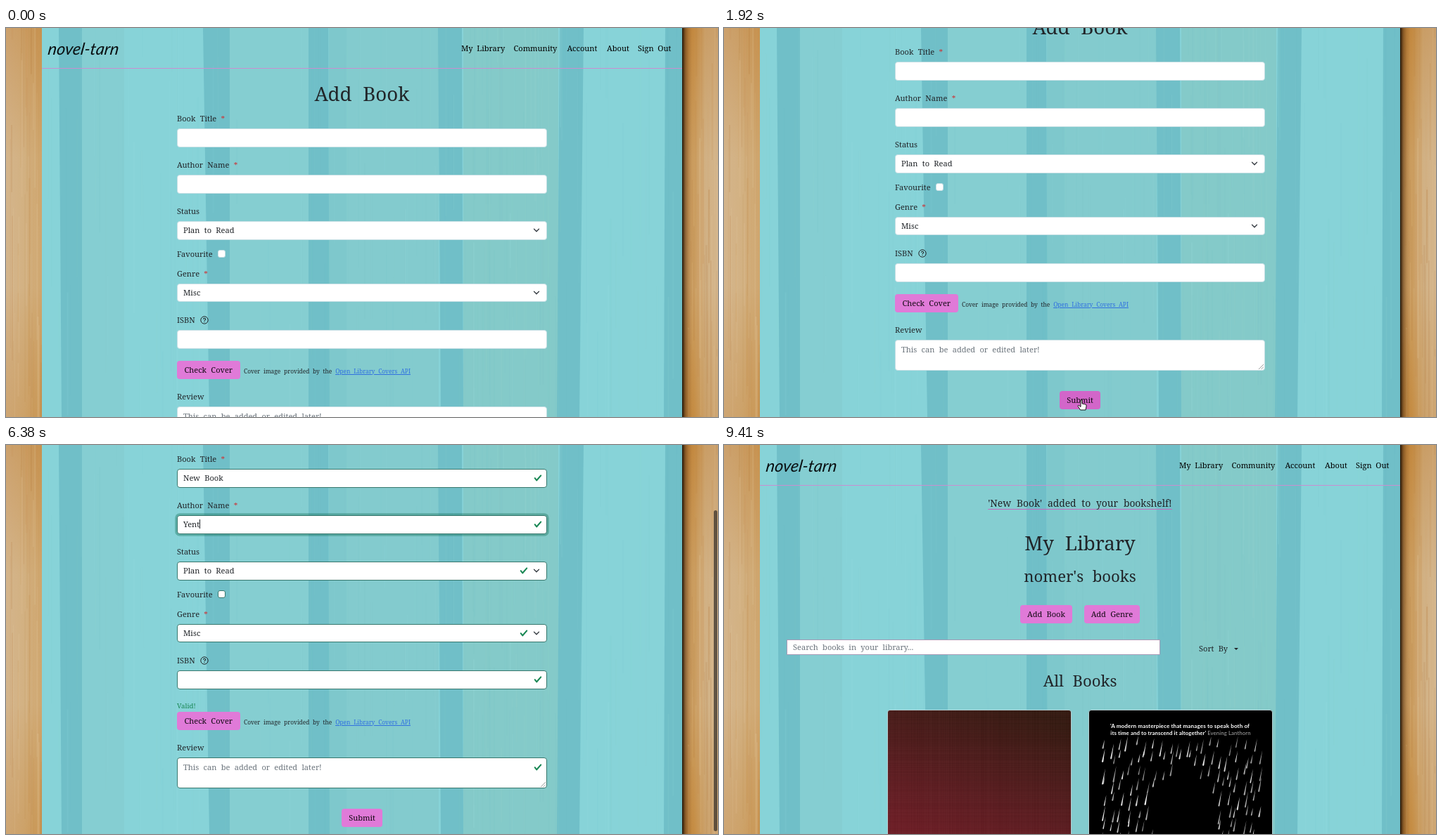
Write an HTML page with a canvas that moves like this. It is 1012 by 554 pixels and loops after 9.51 s.

```html
<!DOCTYPE html>
<html lang="en">
<head>
<meta charset="utf-8">
<title>Add Book</title>
<style>
html, body { margin: 0; width: 100%; height: 100%; overflow: hidden; background: #fff; }
#stage { position: absolute; left: 0; top: 0; width: 1012px; height: 554px; overflow: hidden;
  background: #fff; color: #212529; font-family: "Noto Serif", serif; }
#stage div, #stage canvas, #stage svg { position: absolute; }
#view { left: 0; top: 0; width: 1012px; height: 554px; }
#view > canvas { left: 0; top: 0; }
.t { line-height: 0; white-space: pre; word-spacing: .31em; }
.mid { transform: translateX(-50%); }
.t b { color: #cc3336; font-weight: 400; }
.link { color: #2f6fe0; text-decoration: underline; }
.green { color: #198754; }
.hint { color: #6c757d; }
.nav { color: #000; word-spacing: .26em; }
.logo { font: italic 400 23.5px/0 Lato, sans-serif; color: #0a1012; transform: skewX(-8deg); }
.rule { left: 51px; top: 57px; width: 910px; height: 1px; background: #c98fd0; }
.f { left: 243px; width: 526px; box-sizing: border-box; background: #fff;
  border: 1px solid #c6dfe4; border-radius: 4px; }
.ok { border-color: #37776d; }
.bad { border-color: #7f4c63; }
.f .ic-ok, .f .ic-bad { display: none; }
.ok .ic-ok, .bad .ic-bad { display: block; }
.caret { position: absolute; top: -7px; width: 1px; height: 13px; background: #212529; }
.box { left: 301px; top: 315.8px; width: 11px; height: 11px; box-sizing: border-box;
  background: #fff; border: 1px solid #c6dfe4; border-radius: 3px; }
.box.ok { border-color: #37776d; }
.btn { height: 26.5px; background: #e07ad8; border-radius: 4px; color: #140a14; }
.btn.hot { background: #d266c9; }
#bar { left: 1006px; width: 5px; border-radius: 3px; background: #1c1a1a; }
.search { left: 89px; top: 277px; width: 531px; height: 22px; box-sizing: border-box;
  background: #fff; border: 1px solid #a99ab6; }
.tri { left: 725px; top: 288.5px; border: 3px solid transparent; border-top-color: #212529; border-bottom: 0; }
.card { top: 377px; width: 262px; height: 190px; border-radius: 4px; overflow: hidden;
  box-sizing: border-box; border: 1px solid #b5cccf; }
.card canvas { left: -1px; top: -1px; }
.quote { font-family: Lato, sans-serif; font-weight: 700; color: #fff; word-spacing: 0; letter-spacing: .1px; }
.quote span { color: #aaa; font-weight: 400; }
#cursors svg { left: 0; top: 0; overflow: visible; }
</style>
</head>
<body>
<div id="stage">
  <div id="view">
    <canvas id="bg" width="1012" height="554"></canvas>
    <div id="form"></div>
    <div id="library"></div>
  </div>
  <div id="bar"></div>
  <div id="cursors">
    <svg id="arrow" width="8" height="12"><path d="M0 0V9.4L2.2 7.4L3.7 10.8L5.2 10.1L3.8 6.9H6.8Z" fill="#000" stroke="#fff" stroke-width=".7"/></svg>
    <svg id="beam" width="6" height="12"><path d="M-2-5Q0-5 0-3.5Q0-5 2-5M0-4V4M-2 5Q0 5 0 3.5Q0 5 2 5M-1 1.5H1" fill="none" stroke="#222" stroke-width=".9"/></svg>
    <svg id="hand" width="12" height="15"><path d="M-1 0Q0-1 1 0V5L6 6Q7.500 6.500 7 9L6 14H-1.500L-5 8.500Q-5 7-3.500 7.500L-1 9.500Z" fill="#fff" stroke="#000" stroke-width=".9"/></svg>
  </div>
</div>
<script>
const $ = id => document.getElementById(id);
const LOOP = 9510, REM = 11.06, PAGE = 649, EXTRA = 15;

let seed = 7;
const rnd = (a = 0, b = 1) => {
  seed = (seed * 16807) % 2147483647;
  return a + (b - a) * seed / 2147483647;
};

// ---------- markup helpers ----------
const text = (x, y, str, cls = '', size = REM) =>
  `<div class="t ${cls}" style="left:${x}px;top:${y}px;font-size:${size}px">${str}</div>`;

const icon = (cls, x, y, body) =>
  `<svg class="${cls}" width="12" height="12" viewBox="0 0 12 12" fill="none" style="left:${x - 6}px;top:${y - 6}px">${body}</svg>`;

const tick = x => icon('ic-ok', x, 12.2,
  '<path transform="scale(1.5)" fill="#198754" d="M2.3 6.73.6 4.53c-.4-1.04.46-1.4 1.1-.8l1.1 1.4 3.4-3.8c.6-.63 1.6-.27 1.2.7l-4 4.6c-.43.5-.8.4-1.1.1z"/>');
const alertIcon = icon('ic-bad', 512, 12.2,
  '<circle cx="6" cy="6" r="4.900" stroke="#7a3f58"/><path d="M6 3.200V6.700M6 7.700V9" stroke="#7a3f58" stroke-width="1.300"/>');
const chevron = icon('', 510, 12.2, '<path d="M2.500 4.300L6 7.800L9.500 4.300" stroke="#343a40" stroke-width="1.300" stroke-linecap="round"/>');
const help = icon('', 281.5, 415.5,
  '<circle cx="6" cy="6" r="5.200" stroke="#212529"/><path d="M4.400 4.800Q4.500 3.300 6 3.300T7.600 4.700Q7.600 5.500 6.600 6Q6 6.400 6 7.100M6 8.100V9.100" stroke="#212529" stroke-width="1.100"/>');

const field = (id, y, inner, h = 26.5) =>
  `<div class="f" id="${id}" style="top:${y}px;height:${h}px">${inner}</div>`;
const entry = (id, y) => field(id, y, `<div id="${id}Text">${text(8, 12.2, '')}</div>${tick(512)}${alertIcon}`);
const select = (id, y, value) => field(id, y, text(8, 12.2, value) + tick(492) + chevron);
const button = (x, y, w, label, id = '') =>
  `<div class="btn" ${id && `id="${id}"`} style="left:${x}px;top:${y}px;width:${w}px">${text(w / 2, 13, label, 'mid')}</div>`;

const header = text(60, 29, 'novel-tarn', 'logo', 23.5) + '<div class="rule"></div>' +
  [[647, 'My Library'], [721.5, 'Community'], [797.5, 'Account'], [854, 'About'], [898, 'Sign Out']]
    .map(([x, s]) => text(x, 29, s, 'nav')).join('');

$('form').innerHTML = header +
  text(506, 92.5, 'Add Book', 'mid', 27.7) +
  text(243, 128.5, 'Book Title <b>*</b>') + entry('title', 143) +
  text(243, 194.7, 'Author Name <b>*</b>') + entry('author', 209) +
  text(243, 261, 'Status') + select('status', 275.2, 'Plan to Read') +
  text(243, 321.5, 'Favourite') + '<div class="box" id="fav"></div>' +
  text(243, 349.5, 'Genre <b>*</b>') + select('genre', 363.6, 'Misc') +
  text(243, 415.5, 'ISBN') + help +
  field('isbn', 430, tick(512) +
    `<svg id="spin" width="11" height="17" style="left:505px;top:4px"><rect width="11" height="17" rx="1" fill="#eee"/>
     <path d="M3 5.500L5.500 2.500L8 5.500ZM3 11.500L5.500 14.500L8 11.500Z" fill="#444"/></svg>`) +
  `<div id="valid">${text(243, 480.8, 'Valid!', 'green', 9.7)}</div>
  <div id="tail">` +
  button(243, 473.5, 89.5, 'Check Cover') +
  text(338, 488.5, 'Cover image provided by the <span class="link">Open Library Covers API</span>', '', 8.4) +
  text(243, 525, 'Review') +
  field('review', 539.4, text(8, 12.2, 'This can be added or edited later!', 'hint') + tick(512) +
    '<svg width="7" height="7" style="right:1px;bottom:1px"><path d="M0 7L7 0M3.500 7L7 3.500" stroke="#888" stroke-width=".8"/></svg>', 43.5) +
  button(477, 611.6, 58, 'Submit', 'submit') + '</div>';

$('library').innerHTML = header +
  text(506, 83, `<span style="text-decoration:underline 1px #c766bd;text-underline-offset:2.500px">'New Book' added to your bookshelf!</span>`, 'mid', 13.8) +
  text(506, 138.5, 'My Library', 'mid', 27.7) +
  text(506, 186, "nomer's books", 'mid', 22.1) +
  button(421, 227.5, 74, 'Add Book') + button(512, 227.5, 79, 'Add Genre') +
  `<div class="search">${text(8, 10, 'Search books in your library...', 'hint')}</div>` +
  text(675, 290, 'Sort By') + '<div class="tri"></div>' +
  text(506, 335, 'All Books', 'mid', 22.1) +
  `<div id="covers">
    <div class="card" style="left:232px"><canvas id="cloth" width="262" height="190"></canvas></div>
    <div class="card" style="left:518px;background:#000"><canvas id="rain" width="262" height="190"></canvas>` +
  text(129, 22, "'A modern masterpiece that manages to speak both of", 'quote mid', 8.1) +
  text(130, 32, "its time and to transcend it altogether' <span>Evening Lanthorn</span>", 'quote mid', 7.8) +
  '</div></div>';

// ---------- painted surfaces ----------
function ramp(g, x0, y0, x1, y1, colors) {
  const r = g.createLinearGradient(x0, y0, x1, y1);
  colors.forEach((c, i) => r.addColorStop(i / (colors.length - 1), c));
  return r;
}

function streaks(g, n, x0, x1, colors, alpha) {
  for (let i = 0; i < n; i++) {
    g.globalAlpha = rnd(.2, 1) * alpha;
    g.fillStyle = colors[i % colors.length];
    g.fillRect(rnd(x0, x1), rnd(-150, 480), rnd(.6, 2.5), rnd(60, 320));
  }
  g.globalAlpha = 1;
}

function paintWall() {
  const g = $('bg').getContext('2d');
  g.fillStyle = ramp(g, 0, 0, 51, 0, ['#d2b084', '#d0ab76', '#ca9a58']);
  g.fillRect(0, 0, 51, 554);
  g.fillStyle = ramp(g, 961, 0, 1012, 0, ['#b97d36', '#c68f45', '#ceab7a', '#d1b083']);
  g.fillRect(961, 0, 51, 554);
  g.fillStyle = ramp(g, 0, 0, 0, 554, ['rgba(190,125,55,.3)', 'rgba(216,190,155,.3)', 'rgba(216,190,155,.35)', 'rgba(195,135,65,.25)']);
  g.fillRect(0, 0, 51, 554);
  g.fillRect(961, 0, 51, 554);
  streaks(g, 45, 0, 50, ['#a8682c', '#ead2b0', '#c38440'], .2);
  streaks(g, 45, 964, 1012, ['#a8682c', '#e6cda5', '#c38440'], .18);

  g.fillStyle = '#87d3d8';
  g.fillRect(51, 0, 910, 554);
  for (const [x, w, c] of [[108, 60, '#85ced2'], [318, 112, '#85ced1'], [459, 156, '#83cbce'], [650, 135, '#84cac9']]) {
    g.fillStyle = c;
    g.fillRect(x, 0, w, 554);
  }
  // darker plank stripes: top left, top right, bottom left, bottom right
  const stripes = [[75, 108, 79, 108], [280, 318, 289, 318], [430, 458, 430, 460],
    [614, 648, 618, 650], [787, 821, 783, 815], [937, 961, 935, 961]];
  for (const [a, b, c, d] of stripes) {
    g.fillStyle = '#70bfc8';
    g.beginPath();
    g.moveTo(a, 0); g.lineTo(b, 0); g.lineTo(d, 554); g.lineTo(c, 554);
    g.fill();
  }
  g.fillStyle = 'rgba(112,191,200,.3)';
  g.fillRect(458, 0, 26, 554);
  streaks(g, 190, 53, 958, ['#a5e3e5', '#6cb9c2', '#8fd0c6'], .1);
  streaks(g, 50, 655, 783, ['#9fd6cc', '#74bfc6'], .16);
  g.fillStyle = ramp(g, 961, 0, 975, 0, ['rgba(25,15,5,.95)', 'rgba(60,32,8,.42)', 'rgba(90,50,10,.15)', 'rgba(90,50,10,0)']);
  g.fillRect(961, 0, 14, 554);
}

function paintCloth() {
  const g = $('cloth').getContext('2d');
  g.fillStyle = ramp(g, 175, -5, 110, 195, ['#30180f', '#451a18', '#581b1f', '#681c24']);
  g.fillRect(0, 0, 262, 190);
  for (let i = 0; i < 262; i++) {
    g.fillStyle = `rgba(255,150,150,${rnd(0, .03)})`;
    g.fillRect(i, 0, 1, 190);
    g.fillRect(0, i, 262, 1);
  }
}

function paintRain() {
  const g = $('rain').getContext('2d');
  g.fillStyle = '#fff';
  for (let row = 0; row < 8; row++) {
    for (let col = 0; col < 20; col++) {
      const x = 24 + col * 11.8 + rnd(-4, 4), y = 41 + row * 19 + rnd(-5, 8), len = rnd(12, 24);
      const inHump = Math.hypot((x - 138) / 44, Math.max(0, 130 - y - len / 2) / 45) < 1;
      if (inHump || x > 248) continue;
      // a drop: fine at the top, fuller at the foot
      const w = rnd(.7, 1.2), foot = x - len * .17;
      g.globalAlpha = rnd(.55, .95);
      g.beginPath();
      g.moveTo(x, y);
      g.lineTo(foot - w, y + len - 2);
      g.quadraticCurveTo(foot - .3, y + len + 1, foot + w, y + len - 2);
      g.fill();
    }
  }
}

paintWall(); paintCloth(); paintRain();

// ---------- timeline: each row holds from its time on ----------
const SCROLL = [[0, 0], [870, 12], [970, 42], [1060, 70], [1160, 88], [1260, 97], [1350, 99], [1450, 98],
  [1550, 97], [1640, 96], [1740, 95], [6380, 109], [6480, 112], [6570, 113], [6670, 112], [6770, 111], [6870, 110]];
const BAR = [[0, 0], [870, .62], [1550, .45], [1640, .2], [1740, 0], [6380, .62], [6960, .5], [7050, .28], [7150, .12], [7250, 0]];
const POINTER = [[0, ''], [180, 'arrow', 699, 182], [280, 'beam', 430, 158], [870, 'beam', 488, 320],
  [970, 'beam', 501, 367], [1740, 'arrow', 499, 512], [1830, 'hand', 504, 532], [1920, 'hand', 508, 530],
  [2010, 'hand', 511, 526], [3090, 'beam', 508, 478], [3190, 'arrow', 497, 415], [3280, 'beam', 474, 335],
  [3380, 'arrow', 444, 240], [3470, 'arrow', 415, 156], [3570, 'arrow', 391, 98], [3660, 'beam', 377, 68],
  [3760, 'beam', 374, 62], [5120, ''], [6770, 'arrow', 438, 352], [6870, 'arrow', 455, 396], [6960, 'arrow', 464, 418],
  [7050, 'arrow', 467, 425], [7150, 'beam', 476, 456], [7250, 'arrow', 488, 500], [7350, 'hand', 500, 526],
  [7440, 'hand', 506, 535], [8040, 'arrow', 506, 535], [8130, 'arrow', 877, 88], [8530, 'arrow', 889, 60],
  [8620, 'hand', 902, 28], [8710, 'arrow', 903, -2], [9410, '']];
const TITLE = [[0, ''], [4440, 'N'], [4540, 'Ne'], [4630, 'New'], [4730, 'New '], [4930, 'New B'],
  [5120, 'New Bo'], [5220, 'New Boo'], [5310, 'New Book']];
const AUTHOR = [[0, ''], [5790, 'Y'], [5890, 'Ye'], [5980, 'Yen'], [6080, 'Yent']];
const TITLE_RING = [[0, 0], [3950, .3], [4050, .8], [4150, 1], [5410, .6], [5510, .2], [5600, 0]];
const AUTHOR_RING = [[0, 0], [5410, .4], [5510, .8], [5600, 1], [7550, .5], [7640, .15], [7740, 0]];
const SUBMIT_RING = [[0, 0], [7550, .5], [7640, .85], [7740, 1]];

const at = (rows, t) => {
  let row = rows[0];
  for (const r of rows) if (r[0] <= t) row = r;
  return row;
};
const show = (id, on) => { $(id).style.display = on ? 'block' : 'none'; };

function entryState(id, value, checked, focused, ring) {
  const el = $(id), out = $(id + 'Text').firstChild;
  el.className = 'f ' + (checked ? (value ? 'ok' : 'bad') : '');
  const rgb = value ? '16,110,80' : '200,53,90';
  el.style.boxShadow = ring ? `0 0 0 2.8px rgba(${rgb},${.36 * ring})` : 'none';
  const html = value + (focused ? '<i class="caret"></i>' : '');
  if (out.innerHTML !== html) out.innerHTML = html;
}

function render(t) {
  const done = t >= 8040, checked = t >= 2410;
  show('form', !done);
  show('library', done);
  show('covers', t >= 8130);

  const height = PAGE + (checked ? EXTRA : 0), max = height - 554;
  const scroll = done ? 0 : at(SCROLL, t)[1];
  const inside = Math.min(scroll, max);
  $('view').style.transform = `translateY(${inside - scroll}px)`;
  $('form').style.transform = `translateY(${-inside}px)`;
  $('tail').style.transform = `translateY(${checked ? EXTRA : 0}px)`;
  show('valid', checked);

  const bar = $('bar').style;
  bar.opacity = at(BAR, t)[1];
  bar.top = inside * 554 / height + 2 + 'px';
  bar.height = 554 * 554 / height - 5 + 'px';

  for (const id of ['status', 'genre', 'isbn', 'review']) $(id).className = checked ? 'f ok' : 'f';
  $('fav').className = checked ? 'box ok' : 'box';
  show('spin', t >= 970 && t < 1740);
  entryState('title', at(TITLE, t)[1], checked, t >= 3950 && t < 5410, at(TITLE_RING, t)[1]);
  entryState('author', at(AUTHOR, t)[1], checked, t >= 5410 && t < 7550, at(AUTHOR_RING, t)[1]);

  const hot = (t >= 1830 && t < 2410) || t >= 7350;
  $('submit').className = hot ? 'btn hot' : 'btn';
  $('submit').style.boxShadow = `0 0 0 2.8px rgba(190,90,190,${.4 * at(SUBMIT_RING, t)[1]})`;

  const [, kind, x, y] = at(POINTER, t);
  for (const id of ['arrow', 'beam', 'hand']) show(id, id === kind);
  if (kind) $(kind).style.transform = `translate(${x}px,${y}px)`;
}

const start = performance.now();
function frame() {
  render((performance.now() - start) % LOOP);
  requestAnimationFrame(frame);
}
frame();
</script>
</body>
</html>
```
